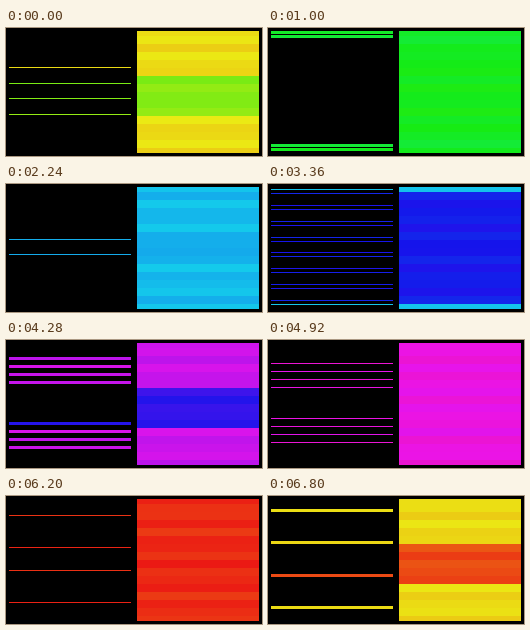
Animation, 256 px wide and 128 px high, one loop 6.84 s. Source, as an HTML page with a canvas:

```html
<!DOCTYPE html>
<html lang="en">
<head>
<meta charset="utf-8">
<title>Folded lines</title>
<style>
  html, body { margin: 0; width: 100%; height: 100%; overflow: hidden; background: #000; }
  canvas { display: block; width: 256px; height: 128px; }
</style>
</head>
<body>
<canvas id="stage" width="256" height="128"></canvas>
<script>
const ctx = document.getElementById('stage').getContext('2d');
const STEP = 40, STEPS = 171;
const TOP = 3, BOTTOM = 125, SIZE = 122, LEFT_X = 3, RIGHT_X = 131;
const RING = 120, LINE_CENTER = 62.5;
const BAND = 8, CORE_CENTER = 66;

// gen: automaton generation; core: half height of the middle zone
const keys = [
  { step: 0, gen: 24, core: 19, inner: 88, outer: 56 },
  { step: 25, gen: 67, core: 40, inner: 121, outer: 126 },
  { step: 56, gen: 128, core: 8, inner: 199, outer: 193 },
  { step: 84, gen: 178, core: 56, inner: 239, outer: 188 },
  { step: 107, gen: 285, core: 19, inner: 248, outer: 291 },
  { step: 139, gen: 402, core: 36, inner: 355, outer: 315 },
  { step: 170, gen: 529, core: 19, inner: 375, outer: 415 }
];

function stateAt(step) {
  const next = Math.max(1, keys.findIndex(key => key.step >= step));
  const a = keys[next - 1], b = keys[next];
  const t = (step - a.step) / (b.step - a.step);
  const mix = name => a[name] + (b[name] - a[name]) * t;
  return {
    step,
    gen: Math.round(mix('gen')),
    core: mix('core'), inner: mix('inner'), outer: mix('outer')
  };
}

const wrap = d => ((d + RING / 2) % RING + RING) % RING - RING / 2;

// XOR of both neighbours from one seed on a ring: every set bit
// of the generation splits each line in two, and pairs cancel.
function lineOffsets(gen) {
  let cells = new Set([0]);
  for (let bit = 2; bit <= gen; bit *= 2) {
    if (!(gen & bit)) continue;
    const split = new Set();
    for (const cell of cells) {
      for (const d of [wrap(cell - bit), wrap(cell + bit)]) {
        if (!split.delete(d)) split.add(d);
      }
    }
    cells = split;
  }
  return [...cells];
}

const ripple = (step, band) => 4 * Math.sin(band * 2.4 + step);

function colorAt(y, { step, core, inner, outer }) {
  const band = Math.floor(y / BAND);
  const middle = (band + 0.5) * BAND;
  const hue = Math.abs(middle - CORE_CENTER) < core ? inner : outer;
  return `hsl(${hue + ripple(step, band)}, 84%, 50%)`;
}

function rect(color, x, y, height) {
  ctx.fillStyle = color;
  ctx.fillRect(x, y, SIZE, height);
}

function drawLines(state) {
  const gen = 8 + (state.gen - 8) % RING;
  const odd = gen % 2;
  const thick = odd ? 3 : 1;
  const shift = odd ? 0.5 : -0.5;
  for (const d of lineOffsets(gen)) {
    const y = LINE_CENTER + d + shift * (d < 0 ? -1 : 1);
    const top = y - (thick - 1) / 2;
    if (top < TOP || top + thick > BOTTOM) continue;
    rect(colorAt(y, state), LEFT_X, top, thick);
  }
}

function drawBands(state) {
  for (let y = 0; y < BOTTOM; y += BAND) {
    const top = Math.max(y, TOP);
    rect(colorAt(y, state), RIGHT_X, top, Math.min(y + BAND, BOTTOM) - top);
  }
}

const start = performance.now();
function draw() {
  const time = Math.max(0, performance.now() - start);
  const state = stateAt(Math.floor(time / STEP) % STEPS);
  ctx.fillStyle = '#000';
  ctx.fillRect(0, 0, 256, 128);
  drawLines(state);
  drawBands(state);
  requestAnimationFrame(draw);
}
draw();
</script>
</body>
</html>
```
